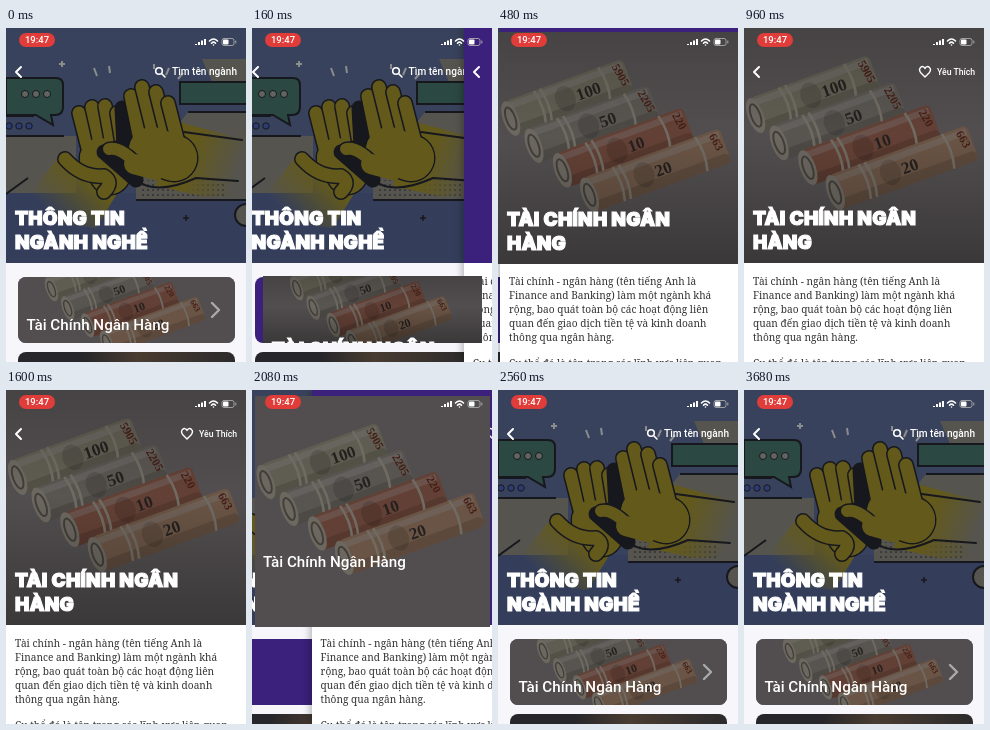
An HTML page for the animation above (3840 ms loop, 240 by 334 pixels).

```html
<!DOCTYPE html>
<html lang="vi">
<head>
<meta charset="utf-8">
<style>
  html, body { margin: 0; width: 100%; height: 100%; overflow: hidden; background: #fff; }
  div, svg, p, h1 { position: absolute; margin: 0; box-sizing: border-box; }
  #stage { width: 240px; height: 334px; overflow: hidden; color: #fff; font: 500 10px Roboto, sans-serif; white-space: nowrap; }
  .page { width: 240px; height: 334px; background: #f7f6fb; }
  #detail { background: #fff; box-shadow: -2px 0 7px #0004; }
  .header { width: 240px; height: 235px; overflow: hidden; }
  #detail .header, .slot { background: #3b207c; }
  .slot { left: 12px; top: 249px; width: 217px; height: 66px; border-radius: 8px; overflow: hidden; }
  .hero, .fill { left: 0; top: 0; width: 100%; height: 100%; overflow: hidden; }
  .fill { background: #0008; }
  .big .fill { background: linear-gradient(#0009, #0008 45%, #000a); }
  h1 { left: 9px; font: 900 19px/24px Inter, sans-serif; letter-spacing: .2px; -webkit-text-stroke: 1.2px #fff; }
  .big h1 { top: calc(69.2% + 16px); }
  .label { left: 8.5px; top: 72%; transform: translateY(-50%); font-size: 15.2px; }
  .action { top: 38px; line-height: 12px; }
  .body { left: 9px; top: 245.5px; color: #333; font: 400 10.15px/14px "Noto Serif", serif; }
  .icons { left: 0; top: 0; fill: none; stroke: #fff; stroke-width: 1.6; stroke-linecap: round; stroke-linejoin: round; }
  #pill { left: 13px; top: 5px; width: 36px; height: 14px; border-radius: 7px; background: #e03d3a; font-size: 9.5px; line-height: 14px; text-align: center; }
</style>
</head>
<body>
<div id="stage">
  <div class="page" id="list">
    <div class="header">
      <svg id="clap" width="240" height="235"></svg>
      <h1 style="top:178.500px">THÔNG TIN<br>NGÀNH NGHỀ</h1>
      <svg class="icons" width="240" height="60">
        <path d="M15 39l-5 5 5 5" stroke-width="2"/>
        <circle cx="153" cy="43" r="3.3"/><path d="M156 46l3 3"/>
      </svg>
      <div class="action" style="left:166px;font-size:10.1px">Tìm tên ngành</div>
    </div>
    <div class="slot">
      <div class="hero small" data-rest></div>
      <svg class="icons" width="217" height="66" data-rest><path d="M194 26l7 7-7 7" stroke="#aaa" stroke-width="2.4"/></svg>
    </div>
    <div class="slot" style="top:324px;background:linear-gradient(90deg, #27262a 30%, #493c31 55%, #2c2a2c)"></div>
  </div>
  <div class="page" id="detail">
    <div class="header">
      <div class="hero big" data-rest></div>
      <svg class="icons" width="240" height="60">
        <path d="M15 39l-5 5 5 5" stroke-width="2"/>
        <path d="M181 49l-4-4c-4-5 2-9 4-4.500c2-4.500 8-.5 4 4.500z" stroke-width="1.400"/>
      </svg>
      <div class="action" style="left:193px;font-size:8.7px">Yêu Thích</div>
    </div>
    <p class="body">Tài chính - ngân hàng (tên tiếng Anh là<br>Finance and Banking) làm một ngành khá<br>rộng, bao quát toàn bộ các hoạt động liên<br>quan đến giao dịch tiền tệ và kinh doanh<br>thông qua ngân hàng.</p>
    <p class="body" style="top:328px">Cụ thể đó là tên trong các lĩnh vực liên quan</p>
  </div>
  <div id="flight">
    <div class="hero big"></div>
    <div class="hero small"></div>
  </div>
  <div id="pill">19:47</div>
  <svg class="icons" width="240" height="24">
    <path d="M190 17v-1M193 17v-3M196 17v-4.500M199 17v-6" stroke-width="2" stroke-linecap="butt"/>
    <path d="M203.500 13q4-4 8 0M205.500 15.200q2-2 4 0M207.500 17v0"/>
    <rect x="216" y="10.500" width="12" height="7" rx="2" stroke="#aaa" stroke-width=".9"/><path d="M229.800 13v2" stroke="#aaa" stroke-width="1"/>
    <rect x="217" y="11.500" width="5.500" height="5" rx="1" fill="#fff" stroke="none"/>
  </svg>
</div>
<script>
const $ = id => document.getElementById(id);
const each = (selector, fn) => document.querySelectorAll(selector).forEach(fn);

// Rolled banknotes, cropped like a cover image
const roll = (x, y, length, color, value, serial) => `
  <g transform="translate(${x} ${y}) rotate(-20)" font-family="Liberation Serif, serif" font-weight="700" fill="#4b4440">
    <rect y="-14" width="${length}" height="28" rx="4" fill="${color}"/>
    <rect y="6" width="${length}" height="8" rx="4" fill="#0002"/>
    <rect x="2" y="-12" width="${length - 4}" height="5" fill="#fff5"/>
    <path d="M24-14q4 14 0 28M29-14q4 14 0 28M${length - 20}-14q4 14 0 28" fill="none" stroke="#efe6d3" stroke-width="2"/>
    <ellipse cx="45" rx="8" ry="10" fill="#0002"/>
    <ellipse rx="6" ry="14" fill="#e8dfcf"/>
    <ellipse rx="3.500" ry="9" fill="none" stroke="#8d8378" stroke-width="1.500"/>
    <text x="54" y="5" font-size="13">${value}</text>
    <text transform="translate(${length - 10} -11) rotate(80)" font-size="9" fill="#94402f">${serial}</text>
  </g>`;
const money = `<svg width="100%" height="100%" viewBox="0 0 240 180" preserveAspectRatio="xMidYMid slice">
  <rect width="240" height="180" fill="#b0a8aa"/>
  ${roll(37, 67, 97, "#cdc6ae", 100, 5905)}
  ${roll(55, 88, 99, "#beb7ad", 50, 2205)}
  ${roll(77, 107, 104, "#d58a72", 10, 220)}
  ${roll(98, 126, 112, "#e3b594", 20, 663)}
</svg><div class="fill"></div>`;
each(".big", el => el.innerHTML = money + "<h1>TÀI CHÍNH NGÂN<br>HÀNG</h1>");
each(".small", el => el.innerHTML = money + '<div class="label">Tài Chính Ngân Hàng</div>');

// Clapping hands
const INK = "#17181d", SKIN = "#63591b", CREAM = "#55544e", TEAL = "#2b4842";
const stroke = (d, color, width) =>
  `<path d="${d}" stroke="${color}" stroke-width="${width}" fill="none" stroke-linecap="round" stroke-linejoin="round"/>`;
const limb = (d, width = 13) => stroke(d, INK, width + 3) + stroke(d, SKIN, width);
const dots = (x, y, step, r, fill) => [0, 1, 2].map(i =>
  `<circle cx="${x + i * step}" cy="${y}" r="${r}" fill="${fill}" stroke="${INK}"/>`).join("");
const hand = (palm, width, fingers) =>
  limb(palm, width) + fingers.map(d => limb(d)).join("") + stroke(palm, SKIN, width);
const fade = (id, x1, y1, x2, y2) => `<linearGradient id="${id}" gradientUnits="userSpaceOnUse" x1="${x1}" y1="${y1}" x2="${x2}" y2="${y2}">
  <stop stop-color="${SKIN}"/><stop offset="1" stop-color="${SKIN}" stop-opacity="0"/></linearGradient>`;
$("clap").innerHTML = `
  ${fade("leftArm", 75, 145, 40, 182)}${fade("rightArm", 185, 130, 232, 146)}
  <pattern id="dotted" width="5" height="5" patternUnits="userSpaceOnUse"><circle cx="2" cy="2" r=".8" fill="${INK}"/></pattern>
  <rect width="240" height="235" fill="#39425c"/>
  <rect y="165" width="240" height="70" fill="#343e5b"/>
  <path d="M0 108H70V165H0ZM182 84H240V172H130V150ZM196 31H240V54H206Z" fill="${CREAM}"/>
  <rect x="134" y="152" width="84" height="20" fill="url(#dotted)"/>
  <g stroke="${INK}" stroke-width="2" fill="none">
    <path d="M0 108H58M0 88H28M182 84H240M130 172H240M0 166L22 150"/>
    <path d="M0 50H50Q57 50 57 57V79Q57 87 49 87H45L47 97L30 87H0Z" fill="${TEAL}"/>
    <path d="M240 54H174V76H240" fill="${TEAL}"/>
    <circle cx="240" cy="187" r="11" fill="${CREAM}"/>
    <path d="M177 190h6M180 187v6" stroke-width="1.500"/>
  </g>
  <path d="M91 48l-3-8M104 45l-1-7M160 47l3-7M172 51l5-6M56 33v6M53 36h6M148 36v5" stroke="#8b8c8c" stroke-width="2"/>
  ${dots(19, 66, 11, 3.500, "#62655f")}${dots(3, 98, 10, 3.200, "#2c3c70")}
  <path d="M52 130L112 164L90 200L5 190Z" fill="url(#leftArm)"/>
  <path d="M165 92L240 112V168H196L150 158Z" fill="url(#rightArm)"/>
  ${hand("M94 130L104 146", 40, ["M73 85L84 128", "M86 79L97 128", "M99 78L108 128", "M111 85L118 128"])}
  ${limb("M59 131Q76 150 98 148Q108 154 98 164")}
  ${stroke("M116 80L118 118L98 124L130 152", INK, 15)}
  ${hand("M146 122L168 130", 46, ["M125 68L134 112", "M136 59L148 108", "M150 64L161 108", "M162 75L172 114"])}
  ${limb("M103 121Q116 118 136 142", 12)}
  ${stroke("M128 136L150 142", SKIN, 20)}
  ${stroke("M130 152Q150 168 190 150L232 153M178 104L236 112", INK, 2)}`;

const bezier = (x1, y1, x2, y2) => x => {
  if (x <= 0) return 0;
  if (x >= 1) return 1;
  const at = (a, b, s) => 3 * a * s * (1 - s) ** 2 + 3 * b * s * s * (1 - s) + s ** 3;
  let low = 0, high = 1;
  for (let i = 0; i < 24; i++) {
    const mid = (low + high) / 2;
    if (at(x1, x2, mid) < x) low = mid; else high = mid;
  }
  return at(y1, y2, low);
};
const slide = bezier(.35, .91, .33, .97);
const fly = bezier(.4, 0, .2, 1);
const LOOP = 3840, STEP = 160, DURATION = 400, OPEN = 142, CLOSE = 2042;
const start = performance.now();

function draw(now) {
  const t = Math.floor(Math.max(0, now - start) % LOOP / STEP) * STEP;
  const closing = t >= CLOSE;
  const u = Math.min(1, Math.max(0, (t - (closing ? CLOSE : OPEN)) / DURATION));
  const toward = v => closing ? 1 - v : v;
  const page = toward(slide(u));
  const moving = u > 0 && u < 1;

  $("list").style.left = -80 * page + "px";
  $("detail").style.left = 240 * (1 - page) + "px";
  $("detail").style.visibility = page > 0 ? "visible" : "hidden";
  each("[data-rest]", el => el.style.display = moving ? "none" : "");

  // The flight follows an arc: sideways motion leads
  const v = fly(u), y = toward(v), x = toward(Math.sqrt(1 - (1 - v) ** 2));
  const flight = $("flight");
  flight.style.cssText = `display:${moving ? "block" : "none"};left:${12 * (1 - x)}px;top:${249 * (1 - y)}px;` +
    `width:${217 + 23 * x}px;height:${66 + 169 * y}px`;
  flight.children[0].style.display = closing ? "none" : "";
  flight.children[1].style.display = closing ? "" : "none";
  requestAnimationFrame(draw);
}
draw(start);
</script>
</body>
</html>
```
